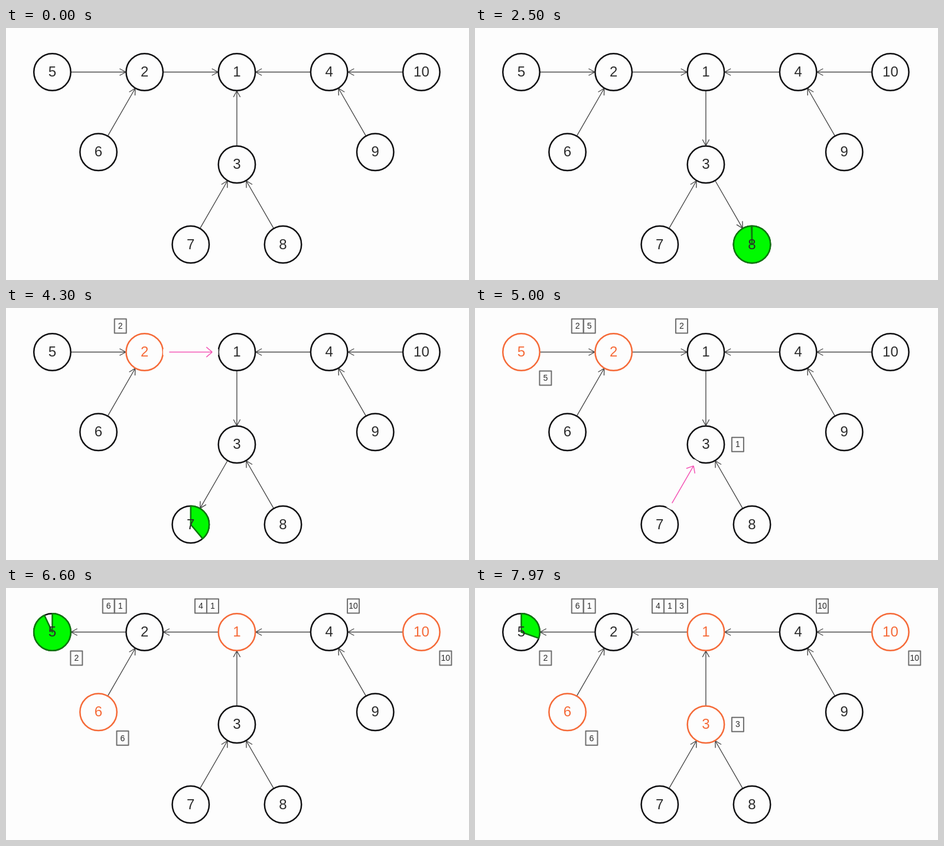
These frames come from a looping animation (784x426 px, 8 s). An HTML page with a canvas:

```html
<!DOCTYPE html>
<html lang="en">
<head>
<meta charset="utf-8">
<title>Token passing on a tree</title>
<style>
  html, body { margin: 0; width: 100%; height: 100%; overflow: hidden; background: #fdfdfd; }
  canvas { display: block; width: 784px; height: 426px; }
</style>
</head>
<body>
<canvas id="stage" width="784" height="426"></canvas>
<script>
const ctx = document.getElementById('stage').getContext('2d');
const LOOP = 8000, HOP = 196, R = 31.25, STEP = 156.25;
const INK = '#101012', LINE = '#4a4a4a', TEXT = '#2c2c2c', BOX = '#6e6e6e';
const ORANGE = '#f56a38', PINK = '#f455b5', PAPER = '#fdfdfd';
const FONT = '"Liberation Sans", Arial, sans-serif';

// Column and row on a triangular grid, initial parent, side of the queue.
const ROW = STEP * Math.sqrt(3) / 2;
const node = (col, y, parent, side) => ({ x: 78.4 + col * STEP, y, parent, side });
const TOP = 74.5, MID = TOP + STEP;
const NODES = {
  1: node(2, TOP, 0, 'topLeft'),
  2: node(1, TOP, 1, 'topLeft'),
  3: node(2, MID, 1, 'right'),
  4: node(3, TOP, 1, 'topRight'),
  5: node(0, TOP, 2, 'below'),
  6: node(0.5, TOP + ROW, 2, 'below'),
  7: node(1.5, MID + ROW, 3, 'below'),
  8: node(2.5, MID + ROW, 3, 'below'),
  9: node(3.5, TOP + ROW, 4, 'below'),
  10: node(4, TOP, 4, 'below')
};
const IDS = Object.keys(NODES).map(Number);

// When each node asks for the token, and how long it keeps it.
const REQUESTS = [[1715, 8], [2636, 7], [4250, 2], [4330, 5], [5300, 6], [5760, 10], [6250, 1], [7350, 3]];
const HOLD = { 8: 500, 7: 1440, 2: 803, 5: 2190 };

// Replays the tree-based mutual exclusion protocol up to the given time.
function stateAt(time) {
  const state = {};
  for (const id of IDS) {
    state[id] = { parent: NODES[id].parent, queue: [], asked: false, wants: false, since: null };
  }
  const events = [];
  const messages = [];
  let now = 0, order = 0;

  const schedule = (at, run) => events.push({ at, run, order: order++ });

  function send(from, to, run) {
    messages.push({ from, to, end: now + HOP });
    schedule(now + HOP, run);
  }

  function advance(id) {
    const s = state[id];
    if (s.parent === 0 && s.since === null && s.queue.length) {
      const next = s.queue.shift();
      if (next === id) {
        s.wants = false;
        s.since = now;
        schedule(now + HOLD[id], () => { s.since = null; advance(id); });
      } else {
        s.parent = next;
        s.asked = false;
        send(id, next, () => { state[next].parent = 0; advance(next); });
      }
    }
    if (s.parent !== 0 && s.queue.length && !s.asked) {
      const target = s.parent;
      s.asked = true;
      send(id, target, () => { state[target].queue.push(id); advance(target); });
    }
  }

  for (const [at, id] of REQUESTS) {
    schedule(at, () => {
      state[id].wants = true;
      state[id].queue.push(id);
      advance(id);
    });
  }
  while (true) {
    events.sort((a, b) => a.at - b.at || a.order - b.order);
    if (!events.length || events[0].at > time) break;
    const event = events.shift();
    now = event.at;
    event.run();
  }
  return { state, messages: messages.filter(m => m.end > time) };
}

function stroke(color, width, path) {
  ctx.strokeStyle = color;
  ctx.lineWidth = width;
  ctx.beginPath();
  path();
  ctx.stroke();
}

function along(from, to, distance) {
  const a = NODES[from], b = NODES[to];
  const angle = Math.atan2(b.y - a.y, b.x - a.x);
  return { x: a.x + Math.cos(angle) * distance, y: a.y + Math.sin(angle) * distance, angle };
}

function line(p, q) {
  ctx.moveTo(p.x, p.y);
  ctx.lineTo(q.x, q.y);
}

function arrow(from, to, margin, color, width, size, spread) {
  const tail = along(from, to, margin), tip = along(to, from, margin);
  const wing = turn => ({
    x: tip.x + Math.cos(tip.angle + turn) * size,
    y: tip.y + Math.sin(tip.angle + turn) * size
  });
  stroke(color, width, () => {
    line(tail, tip);
    line(wing(spread), tip);
    line(wing(-spread), tip);
  });
}

function label(text, x, y, size, color) {
  ctx.font = size + 'px ' + FONT;
  ctx.fillStyle = color;
  ctx.fillText(text, x, y);
}

function drawNode(id, s, time) {
  const { x, y } = NODES[id];
  stroke(s.wants ? ORANGE : INK, 2.5, () => ctx.arc(x, y, R, 0, 2 * Math.PI));
  if (s.since !== null) {
    const left = 1 - (time - s.since) / HOLD[id];
    const start = -Math.PI / 2;
    ctx.fillStyle = '#00fa00';
    stroke('#0b7a0b', 2.5, () => {
      ctx.moveTo(x, y);
      ctx.arc(x, y, R, start, start + left * 2 * Math.PI);
      ctx.closePath();
      ctx.fill();
    });
  }
  label(id, x, y + 7.5, 24, s.wants ? ORANGE : TEXT);
}

function drawQueue(id, queue) {
  const { x, y, side } = NODES[id];
  const w = 20, h = 24;
  const left = side === 'topLeft' ? x - R - w * queue.length + 0.3
    : side === 'right' ? x + 44 : x + R - 0.3;
  const middle = side === 'right' ? y : y + (side === 'below' ? 44 : -44);
  queue.forEach((item, i) => {
    const cell = left + i * w;
    stroke(BOX, 2, () => ctx.rect(cell, middle - h / 2, w, h));
    label(item, cell + w / 2, middle + 4.7, 14, TEXT);
  });
}

function draw(time) {
  const { state, messages } = stateAt(time);
  ctx.fillStyle = PAPER;
  ctx.fillRect(0, 0, 784, 426);
  ctx.textAlign = 'center';
  ctx.lineJoin = 'round';

  const busy = (a, b) => messages.some(m => m.from === a && m.to === b || m.from === b && m.to === a);
  for (const id of IDS) {
    const { parent } = state[id];
    if (parent && !busy(id, parent)) arrow(id, parent, R + 0.5, LINE, 1.4, 12, 0.5);
  }
  for (const id of IDS) drawNode(id, state[id], time);
  for (const { from, to } of messages) {
    for (const [a, b] of [[from, to], [to, from]]) {
      stroke(PAPER, 10, () => line(along(a, b, R), along(a, b, R + 10)));
    }
    arrow(from, to, 41.7, PINK, 1.5, 13, 0.7);
  }
  for (const id of IDS) drawQueue(id, state[id].queue);
}

const begin = performance.now();
function frame() {
  draw((performance.now() - begin) % LOOP);
  requestAnimationFrame(frame);
}
frame();
</script>
</body>
</html>
```
